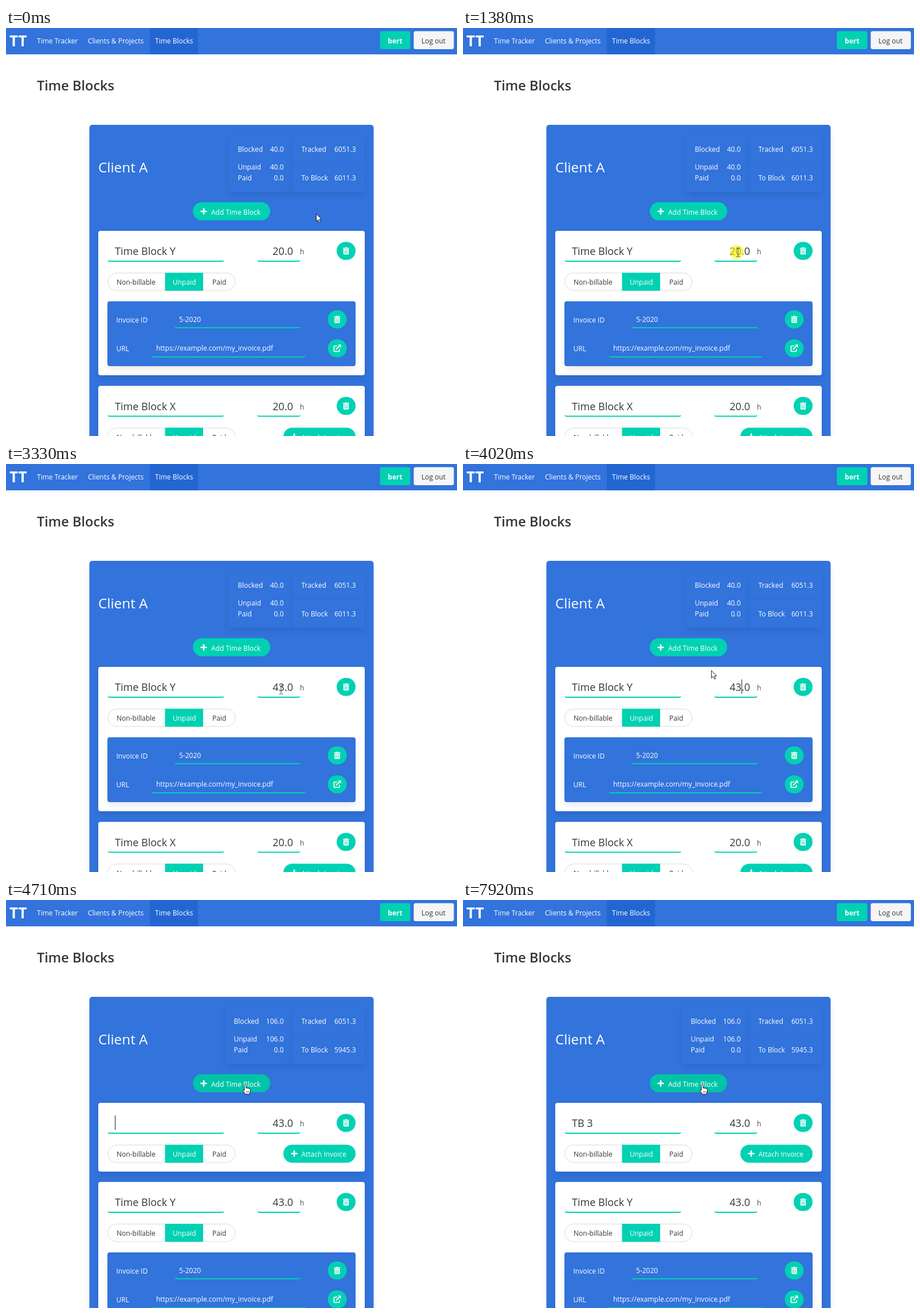
An HTML page that plays this animation: 787x712 px, repeating every 8000 ms.

```html
<!DOCTYPE html>
<html lang="en">
<head>
<meta charset="utf-8">
<title>Time Blocks</title>
<style>
html, body { margin: 0; width: 100%; height: 100%; overflow: hidden; background: #fff; }
svg { display: block; }
text { font-family: "Open Sans", "Noto Sans", sans-serif; font-size: 12px; white-space: pre; }
.big { font-size: 18px; }
.shade { fill: #0a0a0a; opacity: .1; filter: blur(6.3px); }
</style>
</head>
<body>
<svg id="stage" width="787" height="712" viewBox="0 0 787 712"></svg>
<script>
const LOOP = 8000;
const BLUE = '#3273dc', TEAL = '#00d1b2', DARK = '#363636', WHITE = '#fff';
const HOVER = '#00c4a7', PRESSED = '#00b89c';

// drawing helpers
const rect = (x, y, w, h, fill, r = 0, more = '') =>
  `<rect x="${x}" y="${y}" width="${w}" height="${h}" rx="${r}" fill="${fill}" ${more}/>`;
const text = (x, y, s, fill = DARK, more = '') =>
  `<text x="${x}" y="${y}" fill="${fill}" ${more}>${s}</text>`;
const group = (x, y, body, more = '') =>
  `<g transform="translate(${x} ${y})" ${more}>${body}</g>`;
const box = (x, y, w, h, fill, r = 4) =>
  rect(x + 1.6, y + 7.9, w - 3.2, h - 3.2, '#0a0a0a', r, 'class="shade"') +
  rect(x - 1, y - 1, w + 2, h + 2, '#0a0a0a', r + 1, 'fill-opacity=".02"') +
  rect(x, y, w, h, fill, r);
const underline = (x, y, w) =>
  `<path fill="${TEAL}" d="M${x} ${y - 1}Q${x + 1} ${y} ${x + 4} ${y}H${x + w - 4}Q${x + w - 1} ${y} ${x + w} ${y - 1}
   Q${x + w - 1} ${y + 2} ${x + w - 4} ${y + 2}H${x + 4}Q${x + 1} ${y + 2} ${x} ${y - 1}Z"/>`;
const plus = (x, y) =>
  `<path d="M${x - 4.5} ${y}h9M${x} ${y - 4.5}v9" stroke="#fff" stroke-width="2.6" stroke-linecap="round"/>`;
const pill = (x, y, w, fill = TEAL, more = '') => rect(x, y, w, 31.5, fill, 15.75, more);

const trash = `<path fill="#fff" d="M-5.5-5.2H-2.2L-1.5-6.3H1.5L2.2-5.2H5.5V-3.7H-5.5ZM-4.7-3H4.7V5.1Q4.7 6.3 3.5 6.3H-3.5Q-4.7 6.3-4.7 5.1Z"/>
  <path d="M-2.4-.9V4.3M0-.9V4.3M2.4-.9V4.3" stroke="${TEAL}" stroke-width=".9" stroke-linecap="round"/>`;
const openLink = `<path fill="none" stroke="#fff" stroke-width="1.7" stroke-linejoin="round" stroke-linecap="round"
  d="M-.5-4H-4.8Q-5.6-4-5.6-3.2V4.6Q-5.6 5.4-4.8 5.4H3Q3.8 5.4 3.8 4.6V1.6M-1.6 1.4L4-4.2"/>
  <path fill="#fff" d="M1.6-6.3H6.3V-1.6Z" stroke="#fff" stroke-width=".6" stroke-linejoin="round"/>`;
const roundButton = (x, y, icon) => pill(x - 16.5, y - 15.75, 33) + group(x, y, icon);

const toggle = y =>
  rect(177.5, y + .5, 222.5, 30.5, WHITE, 15.25, 'stroke="#dbdbdb"') +
  rect(277.5, y, 66.5, 31.5, TEAL) +
  text(193, y + 21, 'Non-billable') + text(291, y + 21, 'Unpaid', WHITE) + text(360, y + 21, 'Paid');

const invoice =
  box(177, 123, 433, 113, BLUE) +
  text(192.5, 160, 'Invoice ID', WHITE) + text(302, 159, '5-2020', WHITE) + underline(294, 168, 221) +
  roundButton(578, 154.5, trash) +
  text(192.5, 210, 'URL', WHITE) + text(262, 209, 'https://example.com/my_invoice.pdf', WHITE) +
  underline(254, 219, 269) + roundButton(578, 205, openLink);
const attach = pill(484, 73, 126) + plus(503, 88.5) + text(515.5, 94, 'Attach Invoice', WHITE);

const card = (y, h, name, hours, extra, ids = ['', '']) => group(0, y,
  box(161, 0, 465, h, WHITE) +
  text(190, 42, name, DARK, `class="big" ${ids[0]}`) + underline(177, 52, 204) +
  text(501, 42, hours, DARK, `class="big" text-anchor="end" ${ids[1]}`) + underline(438, 52, 76) +
  text(513, 41, 'h', '#4a4a4a') + roundButton(593.5, 35, trash) + toggle(73) + extra);

const stat = (x, right, y, label, id, value) =>
  text(x, y, label, WHITE) + text(right, y, value, WHITE, `text-anchor="end" id="${id}"`);

const shapes = {
  arrow: '<path d="M0 0V13L3 10.2L5.2 15L7.3 14L5.2 9.4H9.3Z" fill="#fff" stroke="#111" stroke-width=".9"/>',
  beam: '<path d="M-3-7.5H-1L0-6.5L1-7.5H3M0-6.5V6.5M-3 7.5H-1L0 6.5L1 7.5H3" fill="none" stroke="#444"/>',
  hand: `<path d="M-1.5 11V1.7C-1.5 0 1.5 0 1.5 1.7V7C1.8 6 4 6 4.2 7.4C4.6 6.4 6.6 6.6 6.8 8C7.4 7.2 9 7.6 9 9.2V12.5
    L7.6 17.5H.2L-4 11.4C-4.6 9.6-2.8 9.2-1.5 11Z" fill="#fff" stroke="#111" stroke-width="1"/>
    <path d="M2 12V15M4.2 12V15M6.4 12V15" stroke="#111" stroke-width=".7"/>`
};

const navbar =
  rect(0, 0, 787, 46, BLUE) + rect(251, 0, 84, 46, '#2366d1') +
  text(6, 32, 'TT', WHITE, 'style="font-size:26px;font-weight:700"') +
  text(54, 27, 'Time Tracker', WHITE) + text(143, 27, 'Clients &amp; Projects', WHITE) +
  text(260, 27, 'Time Blocks', WHITE) +
  rect(652.5, 5.5, 53, 31.5, TEAL, 3.5) +
  text(679, 27, 'bert', WHITE, 'text-anchor="middle" font-weight="700"') +
  rect(711.5, 5.5, 70, 31.5, '#f5f5f5', 3.5) + text(725, 27, 'Log out');

const summary = (x, id) => `<g id="${id}">` + box(x, 186, 500 - x, 100, BLUE) +
  text(x + 15.5, 215.5, 'Blocked', WHITE) + text(x + 15.5, 247, 'Unpaid', WHITE) +
  text(x + 15.5, 266, 'Paid', WHITE) + '</g>';

stage.innerHTML = navbar +
  text(54, 109, 'Time Blocks', DARK, 'style="font-size:23.5px;font-weight:600"') +
  box(145.5, 169, 496, 600, BLUE, 5) +
  text(161, 252, 'Client A', WHITE, 'style="font-size:24.3px"') +
  summary(389, 'narrow') + summary(382, 'wide') +
  box(500, 186, 126, 50, BLUE) + box(500, 236, 126, 50, BLUE) +
  stat(0, 484.5, 215.5, '', 'blocked', '') + stat(0, 484.5, 247, '', 'unpaid', '') +
  stat(0, 484.5, 266, '', 'paid', '0.0') +
  stat(515.5, 610.5, 215.5, 'Tracked', 'tracked', '6051.3') +
  stat(515.5, 610.5, 266, 'To Block', 'remaining', '') +
  pill(326, 304, 135, TEAL, 'id="add"') + plus(345, 320) + text(358, 325.5, 'Add Time Block', WHITE) +
  `<g id="before">${card(354, 252, 'Time Block Y', '', invoice, ['', 'id="hours"'])}${card(624.5, 252, 'Time Block X', '20.0', attach)}</g>` +
  `<g id="after">${card(354, 120, '', '43.0', attach, ['id="title"', ''])}${card(492, 252, 'Time Block Y', '43.0', invoice)}</g>` +
  rect(0, 376, 1, 25, '#222', 0, 'id="caret"') +
  '<circle id="glow" r="12.2" fill="#fff500" fill-opacity=".6"/><g id="pointer"></g>';

// step tables: [start time, value...]
const ease = p => p * p * (3 - 2 * p);
const approach = Array.from({ length: 8 }, (_, i) => {
  const p = ease((i + 1) / 8), x = 541.5 - 61.5 * p, y = 324.5 + 67 * p;
  return [690 + i * 77, x, y, y > 375 ? 'beam' : 'arrow'];
});
const pointerSteps = [
  [0, 541.5, 324.5, 'arrow'], ...approach,
  [3330, 480, 394, 'beam'], [3410, 478, 401, 'beam'], [3480, 475, 411, 'arrow'], [3560, 473, 415.5, 'arrow'],
  [4020, 433.5, 360.5, 'arrow'], [4090, 427, 345, 'arrow'], [4170, 421, 332, 'hand'],
  [4250, 418, 325, 'hand'], [4330, 417.5, 321.5, 'hand']
];
const caretSteps = [
  [0, 0], [1470, 475], [1540, 0], [2310, 486], [2480, 0], [2630, 486], [3010, 0], [3480, 486], [4090, 0],
  [4710, 190], [5260, 0], [5810, 190], [6270, 0], [6590, 200], [6820, 0], [6970, 211], [7370, 0], [7670, 215], [7920, 0]
];
const hourSteps = [[0, '20.0'], [1540, '<tspan fill="#fff">20</tspan>.0'], [2310, '4.0'], [2630, '43.0']];
const titleSteps = [[0, ''], [6590, 'T'], [6970, 'TB'], [7670, 'TB '], [7920, 'TB 3']];
const totalSteps = [[0, '40.0', '6011.3'], [4560, '63.0', '5988.3'], [4710, '106.0', '5945.3']];
const addSteps = [[0, TEAL], [4170, HOVER], [4560, PRESSED], [4710, HOVER]];
const glowSteps = [[0, 0], [1380, 478, 391], [1470, 0], [1540, 478, 391], [1610, 0], [4560, 417, 321.5], [4710, 0]];

const at = (steps, t) => steps.findLast(s => s[0] <= t).slice(1);
const el = id => document.getElementById(id);
const show = (node, on) => node.setAttribute('display', on ? 'inline' : 'none');
const put = (node, html) => { if (node.shown !== html) node.innerHTML = node.shown = html; };

el('hours').insertAdjacentHTML('beforebegin', rect(465, 22, 21, 25, '#0078d7', 0, 'id="selection"'));

function draw(t) {
  const added = t >= 4710;
  show(el('before'), !added);
  show(el('after'), added);
  show(el('narrow'), !added);
  show(el('wide'), added);
  show(el('selection'), t >= 1540 && t < 2310);

  const [total, left] = at(totalSteps, t);
  put(el('blocked'), total);
  put(el('unpaid'), total);
  put(el('remaining'), left);
  put(el('hours'), at(hourSteps, t)[0]);
  put(el('title'), at(titleSteps, t)[0]);
  el('add').setAttribute('fill', at(addSteps, t)[0]);

  const [caretX] = at(caretSteps, t);
  show(el('caret'), caretX);
  el('caret').setAttribute('x', caretX);

  const [glowX, glowY = 0] = at(glowSteps, t);
  show(el('glow'), glowX);
  el('glow').setAttribute('cx', glowX);
  el('glow').setAttribute('cy', glowY);

  const [x, y, shape] = at(pointerSteps, t);
  put(el('pointer'), shapes[shape]);
  el('pointer').setAttribute('transform', `translate(${x} ${y})`);
}

const start = performance.now();
function tick() {
  draw((performance.now() - start) % LOOP);
  requestAnimationFrame(tick);
}
tick();
</script>
</body>
</html>
```
